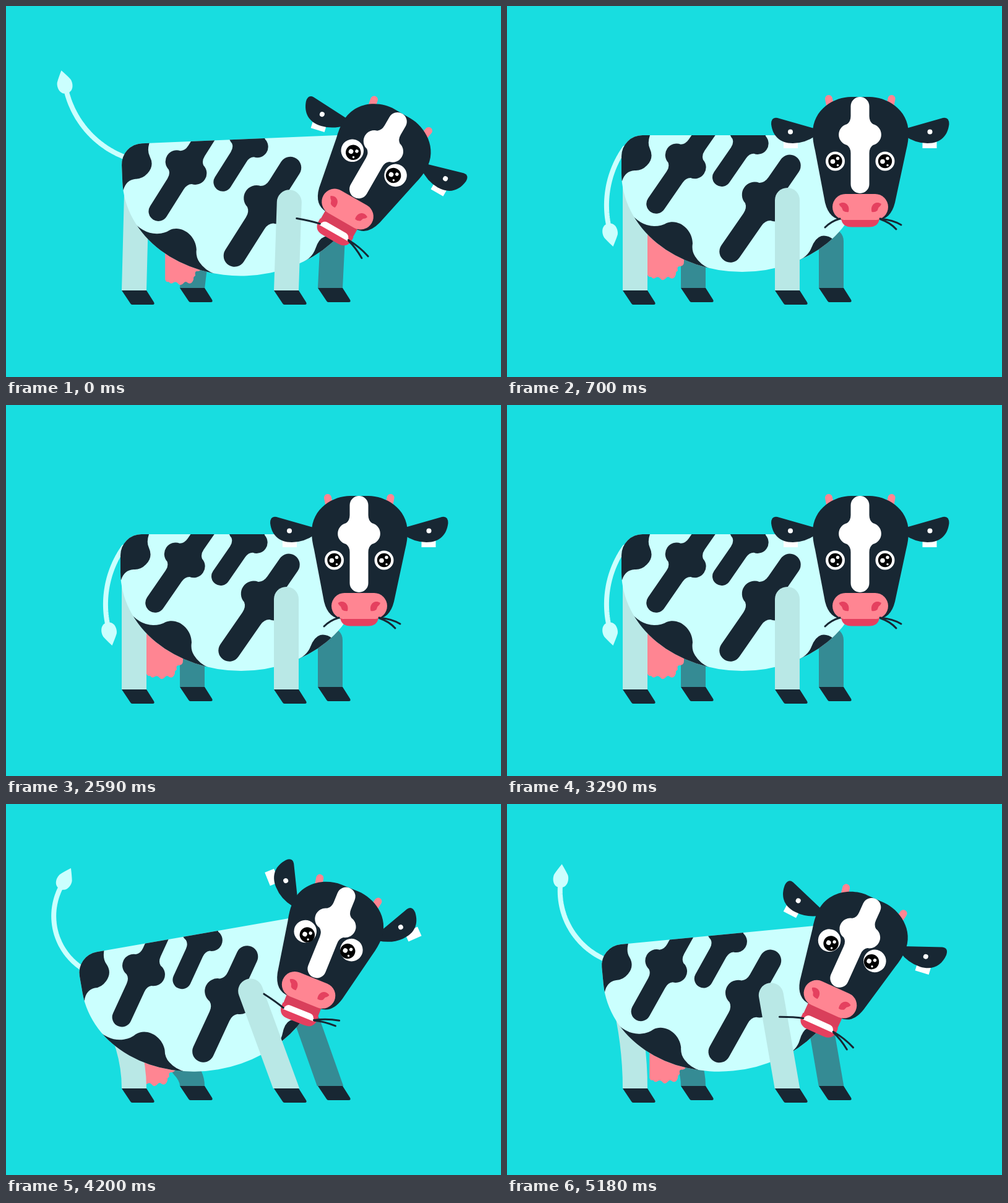
Recreate the animation shown at these times as an HTML page with a canvas. Size 800 px wide and 600 px high, loop 5250 ms.

```html
<!DOCTYPE html>
<html>
<head>
<meta charset="utf-8">
<title>Cow</title>
<style>
html, body { margin: 0; width: 100%; height: 100%; overflow: hidden; background: #18dde0; }
canvas { display: block; }
</style>
</head>
<body>
<canvas id="stage" width="800" height="600"></canvas>
<script>
const ctx = document.getElementById('stage').getContext('2d');
const LOOP = 5250, STEP = 70, RAD = Math.PI / 180;
const SKY = '#18dde0', HIDE = '#cbfffe', SHADE = '#b9e8e6', FAR = '#358b94',
      DARK = '#182733', PINK = '#ff8592', RED = '#e5405f', THROAT = '#d93f5b', WHITE = '#fff';

function ease(t, from, to) {
  const u = Math.min(1, Math.max(0, (t - from) / (to - from)));
  return u * u * (3 - 2 * u);
}
// Rises from 0 to 1 between a and b, falls back between c and d.
const pulse = (t, a, b, c, d) => ease(t, a, b) - ease(t, c, d);
// Runs from 0 to 1 and back once per period.
const wave = (t, start, period) => (1 - Math.cos((t - start) / period * 2 * Math.PI)) / 2;
const mix = (a, b, u) => a + (b - a) * u;

// How far each part of the act has come, from 0 to 1
function actAt(t) {
  const mouth = pulse(t, 3800, 4060, 5240, 5650);
  const swish = wave(t, 700, 472) * mix(0.45, 1.15, ease(t, 1500, 1820));
  return {
    windup: pulse(t, 3430, 3660, 3710, 3940),
    lean: pulse(t, 3710, 3990, 5080, 5280),
    rebound: pulse(t, 5120, 5320, 5320, 5800),
    mouth,
    shake: wave(t, 3875, 650) * mouth,
    ears: pulse(t, 3910, 4070, 5060, 5220),
    look: pulse(t, 1190, 1540, 1960, 2380),
    chew: t > 1051 && t < 3103 ? wave(t, 1050, 513.3) : 0,
    swish: t > 700 && t < 2588 ? swish : 0,
    tailRoot: pulse(t, 3780, 4080, 5260, 5650),
    tailEnd: pulse(t, 3870, 4170, 5340, 5730)
  };
}

function fill(color, path) {
  ctx.fillStyle = color;
  ctx.fill(typeof path === 'string' ? new Path2D(path) : path);
}
function line(color, width, path) {
  ctx.strokeStyle = color;
  ctx.lineWidth = width;
  ctx.stroke(typeof path === 'string' ? new Path2D(path) : path);
}
function disc(color, x, y, r) {
  ctx.fillStyle = color;
  ctx.beginPath();
  ctx.arc(x, y, r, 0, 7);
  ctx.fill();
}
function group(draw) {
  ctx.save();
  draw();
  ctx.restore();
}
function turn(x, y, deg) {
  ctx.translate(x, y);
  ctx.rotate(deg * RAD);
  ctx.translate(-x, -y);
}
function mirror(draw) {
  group(() => {
    ctx.translate(1141.5, 0);
    ctx.scale(-1, 1);
    draw();
  });
}

// A bar with a bulge on both sides; (x, y) is the centre of its lower end.
function blot(color, x, y, deg, scale, bulge, length) {
  group(() => {
    ctx.translate(x, y);
    ctx.rotate(deg * RAD);
    ctx.scale(scale, scale);
    const b = -bulge;
    fill(color, `M15,0 V${b + 30} Q15,${b + 21} 21,${b + 17} A17.5,17.5 0 0 0 21,${b - 17}
      Q15,${b - 21} 15,${b - 30} V${-length} A15,15 0 0 0 -15,${-length}
      V${b - 30} Q-15,${b - 21} -21,${b - 17} A17.5,17.5 0 0 0 -21,${b + 17}
      Q-15,${b + 21} -15,${b + 30} V0 A15,15 0 0 0 15,0Z`);
  });
}

// The hoof stays at (x, y); the hip follows the body, less so when it moves back or ahead.
function leg(x, y, color, hip, back, ahead, straight) {
  const raw = hip.x - x, dx = raw * (raw < 0 ? back : ahead);
  const cx = x + (straight ? dx : Math.max(0, dx)) / 2, cy = (hip.y + y) / 2;
  group(() => {
    ctx.beginPath();
    ctx.rect(0, 0, 800, y);
    ctx.clip();
    ctx.lineCap = 'round';
    line(color, 40, `M${x + dx},${hip.y} Q${cx},${cy} ${x},${y} l${(x - cx) / 2},${(y - cy) / 2}`);
  });
  group(() => {
    ctx.translate(x - 20, y);
    fill(DARK, 'M0,0 H40 L52,19 Q54,23 50,23 H17 Q15,23 14,21Z');
  });
}

// The tail is an arc whose heading turns evenly from root to end.
function drawTail(base, act) {
  const { windup, rebound, shake, swish, tailRoot, tailEnd } = act;
  const root = mix(125 + 7 * windup, 206 + 8 * shake - 8 * rebound, tailRoot);
  const end = mix(78 - 16 * windup + 157 * swish, 283 + 15 * shake - 40 * rebound, tailEnd);
  const length = mix(132, 148, tailRoot), parts = 30;
  const path = new Path2D();
  let { x, y } = base;
  path.moveTo(x, y);
  for (let i = 0; i < parts; i++) {
    const heading = mix(root, end, (i + 0.5) / parts) * RAD;
    x += Math.cos(heading) * length / parts;
    y += Math.sin(heading) * length / parts;
    path.lineTo(x, y);
  }
  group(() => {
    ctx.lineCap = ctx.lineJoin = 'round';
    line(HIDE, 8, path);
    ctx.translate(x, y);
    ctx.rotate(end * RAD);
    fill(HIDE, 'M-4,0 C-4,-12 10,-14 17,-11 Q24,-7 34,0 Q24,7 17,11 C10,14 -4,12 -4,0Z');
  });
}

const torso = new Path2D('M185,243 A34,34 0 0 1 219,209 H541 Q575,209 575,243 V270 A195,160 0 0 1 185,270Z');

function drawTorso() {
  fill(HIDE, torso);
  ctx.clip(torso);
  fill(DARK, 'M180,200 H235 Q225,219 231,231 Q238,246 226,258 Q217,267 206,266 Q191,267 186,283 L180,283Z');
  blot(DARK, 241, 320, 34.6, 1.05, 80, 150);
  blot(DARK, 347, 277, 34.6, 1, 78, 140);
  blot(DARK, 361, 397, 34.7, 1.18, 83, 143);
  fill(DARK, 'M195,330 Q215,356 238,356 Q250,356 258,351 C278,343 300,362 300,384 Q298,396 304,405 Q312,418 328,425 L300,445 L180,400Z');
  fill(DARK, 'M468,413 Q486,406 492,391 Q498,375 508,372 Q518,370 528,378 L520,425Z');
}

function drawUdder({ windup, lean, rebound }) {
  ctx.translate(17 * windup - 12 * lean + 43 * rebound, 17 * windup + 13 * lean + 10 * rebound);
  turn(257, 400, 5 * windup);
  fill(PINK, 'M227,368 V434 Q228,439 233,438 Q236,443 241,439 Q245,437 248,441 Q252,446 257,440 Q260,436 264,440 Q270,443 273,434 Q272,430 276,428 Q274,420 280,421 Q286,420 286,414 V368Z');
}

function ear(deg, slide) {
  group(() => {
    turn(498, 204, deg);
    ctx.fillStyle = WHITE;
    ctx.fillRect(447 - slide, 214, 23, 16);
    fill(DARK, 'M500,199 L437,181 Q427,179 427,191 C429,209 440,222 462,222 Q482,222 500,209Z');
    disc(WHITE, 458, 203.5, 4);
  });
}

function eye(x, y, size, squint, drop) {
  disc(WHITE, x, y, 15.5 * size);
  const px = x + squint, py = y + drop;
  disc('#000', px, py, 11.2 * (1 + (size - 1) / 2));
  disc(WHITE, px - 4, py + 0.5, 3.8);
  disc(WHITE, px + 4, py - 4.5, 2.7);
  disc(WHITE, px + 4, py + 6.5, 1.7);
}

function drawMouth({ mouth, rebound, shake, chew }) {
  const jawX = -8 * chew, jawY = Math.max(0, 28 * mouth - 5 * shake - 5 * rebound * mouth) + 4 * chew;
  if (jawY > 0) fill(THROAT, `M541,330 H601 L${601 + jawX},${346 + jawY} H${541 + jawX}Z`);
  group(() => {
    ctx.translate(jawX, jawY);
    fill(RED, 'M540,336 H602 V344 Q600,357.5 585,357.5 H557 Q542,357.5 540,344Z');
    fill(WHITE, 'M544,346 Q546,336 553,336 H588 Q595,336 597,346Z');
  });
  fill(PINK, 'M547,304 H595 A21,21 0 0 1 595,346 H547 A21,21 0 0 1 547,304Z');
  const nostril = 'M552,333 C555,322 546,314 536.5,320 Q537,323 541,326 L543,331 Q547,334 552,333Z';
  fill(RED, nostril);
  mirror(() => fill(RED, nostril));
  group(() => {
    const pull = 6 * mouth, tilt = 35 * shake;
    ctx.translate(jawX, jawY);
    ctx.lineCap = 'round';
    group(() => {
      ctx.translate(pull, 0);
      turn(538, 344, tilt);
      line(DARK, 3, `M538,344 Q524,348 ${514 - pull * 2},358`);
    });
    ctx.translate(-pull, 0);
    turn(603, 344, -tilt);
    line(DARK, 3, `M603,344 Q624,346 ${637 + pull},354 M604,345 Q619,350 ${629 + pull},361`);
  });
}

function drawHead(neck, act) {
  const { windup, rebound, mouth, ears, look } = act;
  ctx.translate(neck.x - 4 * mouth, neck.y + 9.5 * mouth);
  ctx.rotate((5.5 * windup + 22 * mouth + 11 * rebound + 2 * look) * RAD);
  ctx.translate(-570, -288);
  ctx.lineCap = 'round';
  line(PINK, 12, 'M520,150 L523,166 M621.5,150 L618.5,166');
  ear(46 * ears - 18 * rebound - 4 * windup + 8 * look, 14 * ears);
  mirror(() => ear(46 * ears - 2 * look, 14 * ears));
  fill(DARK, 'M494,206 C494,166 530,147 556,147 H586 C612,147 649,166 649,206 Q649,218 645,234 L627,318 Q620,346 598,346 H544 Q521,346 514,318 L498,234 Q494,218 494,206Z');
  blot(WHITE, 570.5, 288, 0, 1, 80, 126);
  const eyeY = 251 + 9 * windup - 12 * mouth, size = 1 + 0.18 * mouth;
  const squint = (5 - 3 * rebound) * mouth, drop = (4 - 3 * rebound) * mouth;
  eye(530.5, eyeY, size, squint, drop);
  eye(611, eyeY, size, -squint, drop);
  drawMouth(act);
}

function draw(t) {
  const act = actAt(t), { windup, lean, rebound } = act;
  const back = windup + 0.8 * rebound;
  const bx = 19 * back - 42 * lean, by = 12 * back + 3 * lean;
  const deg = -3.1 * back - 9.9 * lean;
  const c = Math.cos(deg * RAD), s = Math.sin(deg * RAD);
  // Where a point of the resting body is now
  const at = (x, y) => ({
    x: 361 + bx + (x - 361) * c - (y - 398) * s,
    y: 398 + by + (x - 361) * s + (y - 398) * c
  });

  ctx.fillStyle = SKY;
  ctx.fillRect(0, 0, 800, 600);
  drawTail(at(190, 230), act);
  leg(301, 456, FAR, at(301, 410), 0.4, 0.5);
  leg(524, 456, FAR, at(524, 380), 0.75, 0.5, true);
  group(() => drawUdder(act));
  leg(207, 460, SHADE, at(207, 290), 0.7, 1);
  group(() => {
    ctx.translate(bx, by);
    turn(361, 398, deg);
    drawTorso();
  });
  leg(453, 460, SHADE, at(453, 314), 1, 1, true);
  group(() => drawHead(at(570, 288), act));
}

const start = performance.now();
function tick() {
  const t = Math.floor((performance.now() - start) % LOOP / STEP) * STEP;
  // The rebound runs on past the end of the loop.
  draw(t < 630 ? t + LOOP : t);
  requestAnimationFrame(tick);
}
tick();
</script>
</body>
</html>
```
